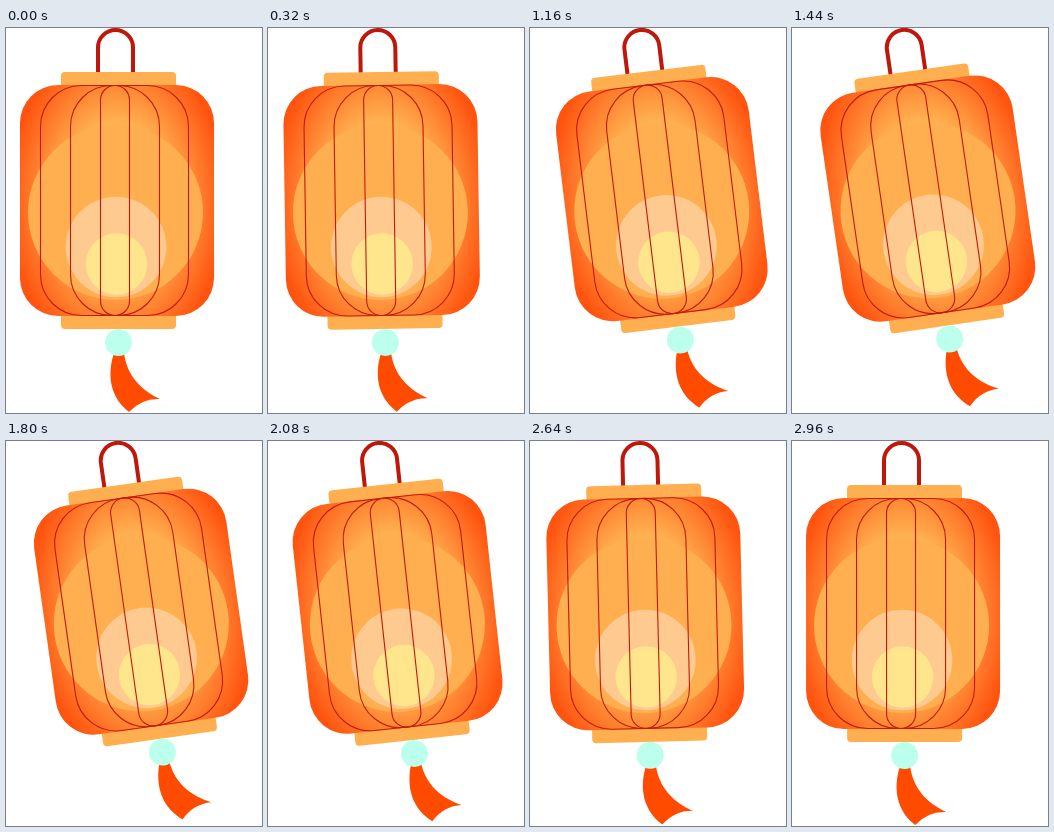
An HTML page that plays this animation: 256 px wide and 385 px high, repeating every 3 s.

```html
<!DOCTYPE html>
<html lang="en">
<head>
<meta charset="utf-8">
<title>Swinging lantern</title>
<style>
  html, body { margin: 0; width: 100%; height: 100%; overflow: hidden; background: #fff; }
  svg { display: block; width: 256px; height: 385px; }
  .ribs { fill: none; stroke: #c4190a; stroke-width: 1.1; }
  .glow { fill: #ffaf50; }
</style>
</head>
<body>
<svg viewBox="0 0 256 385">
  <defs>
    <radialGradient id="paper" gradientUnits="userSpaceOnUse" cx="0" cy="0" r="1"
      gradientTransform="translate(111 172.5) scale(108 160)">
      <stop offset=".5" stop-color="#ffb050"/>
      <stop offset="1" stop-color="#ff5410"/>
    </radialGradient>
  </defs>
  <g id="lantern">
    <path d="M92 46V19.5a17.5 17.5 0 0 1 35 0V46" fill="none" stroke="#be170b" stroke-width="4"/>
    <rect class="glow" x="55" y="44" width="115" height="16" rx="4"/>
    <rect class="glow" x="55" y="285" width="115" height="16" rx="4"/>
    <rect x="14" y="57" width="194" height="231" rx="38" fill="url(#paper)"/>
    <circle class="glow" cx="109.5" cy="184.5" r="87.5"/>
    <circle cx="110" cy="219" r="50.3" fill="#ffca90"/>
    <circle cx="110.5" cy="236" r="30.7" fill="#ffe58c"/>
    <g class="ribs">
      <rect x="34.5" y="57.5" width="148" height="230" rx="41"/>
      <rect x="64.5" y="57.5" width="89" height="230" rx="41"/>
      <rect x="94.5" y="57.5" width="29" height="230" rx="14.5"/>
    </g>
    <path fill="#ff4b00" d="M108 325C103 340 100 366 123 384Q136 370 154 371C135 362 121 348 118 325Z"/>
    <circle cx="112.5" cy="314.5" r="13.5" fill="#bbffec"/>
  </g>
</svg>
<script>
  const LOOP = 3000, PEAK = 1600, STEP = 40, SWING = 8.5;
  const lantern = document.getElementById('lantern');
  const ease = u => u * u * (3 - 2 * u);

  function angle(t) {
    const u = t < PEAK ? t / PEAK : (LOOP - t) / (LOOP - PEAK);
    return -SWING * ease(u);
  }

  function draw(now) {
    const t = Math.floor((now % LOOP) / STEP) * STEP;
    lantern.setAttribute('transform', `rotate(${angle(t)} 110 0)`);
  }

  const start = performance.now();
  function tick() {
    draw(performance.now() - start);
    requestAnimationFrame(tick);
  }
  tick();
</script>
</body>
</html>
```
